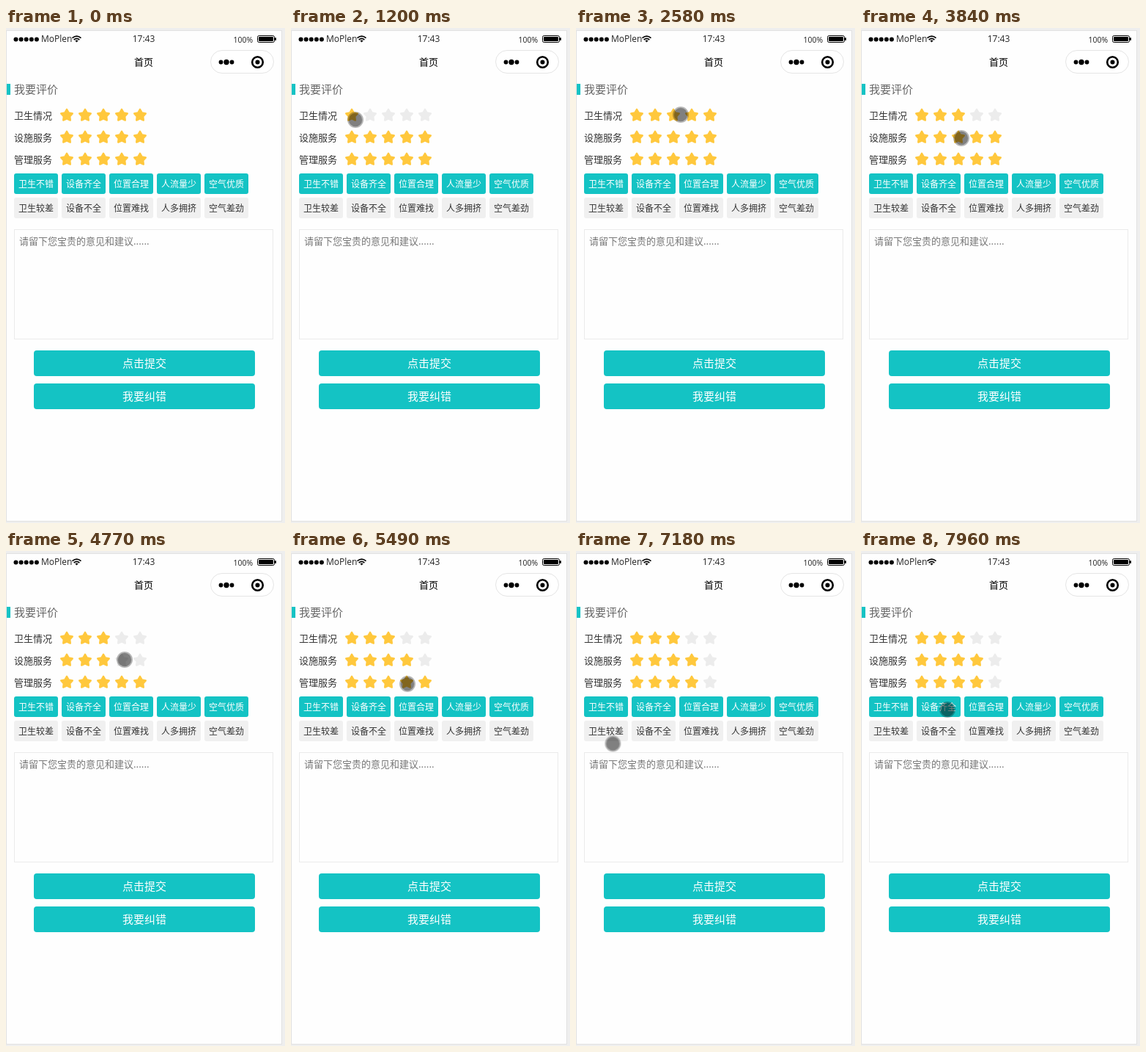
Write an HTML page that moves like this. It is 381 by 674 pixels and loops after 8 s.

```html
<!DOCTYPE html>
<html lang="zh-CN">
<head>
<meta charset="utf-8">
<title>首页</title>
<style>
html, body { margin: 0; width: 100%; height: 100%; overflow: hidden; background: #eee; }
svg { display: block; width: 381px; height: 674px; }
text { font-family: "Noto Sans CJK SC", "Noto Sans CJK", "Noto Sans", sans-serif; fill: #333; }
.latin { font-family: "Open Sans", "Noto Sans", sans-serif; fill: #222; }
.mid { text-anchor: middle; }
.white { fill: #fff; }
.teal { fill: #14c3c4; }
.star { fill: #ffc83d; stroke: #ffc83d; stroke-width: 2.4; stroke-linejoin: round; }

/* 1% = 80 ms */
.r0s1, .r0s2 { animation: rate-a 8s step-end infinite; }
.r0s3, .r0s4 { animation: rate-b 8s step-end infinite; }
.r1s3 { animation: rate-c 8s step-end infinite; }
.r1s4 { animation: rate-d 8s step-end infinite; }
.r2s4 { animation: rate-e 8s step-end infinite; }
@keyframes rate-a {
  15% { fill: #ececec; stroke: #ececec; }
  0%, 27.5%, 100% { fill: #ffc83d; stroke: #ffc83d; }
}
@keyframes rate-b {
  0%, 27.5% { fill: #ffc83d; stroke: #ffc83d; }
  15%, 37.375%, 100% { fill: #ececec; stroke: #ececec; }
}
@keyframes rate-c {
  50.125% { fill: #ececec; stroke: #ececec; }
  0%, 61.75%, 100% { fill: #ffc83d; stroke: #ffc83d; }
}
@keyframes rate-d {
  0% { fill: #ffc83d; stroke: #ffc83d; }
  50.125%, 100% { fill: #ececec; stroke: #ececec; }
}
@keyframes rate-e {
  0% { fill: #ffc83d; stroke: #ffc83d; }
  77.375%, 100% { fill: #ececec; stroke: #ececec; }
}

#touch { animation: move 8s linear infinite, show 8s step-end infinite; }
@keyframes show {
  0% { opacity: 0; }
  2.5%, 100% { opacity: 1; }
}
@keyframes move {
  0%, 2.5% { transform: translate(153px, 605px); }
  3.4% { transform: translate(138px, 515px); }
  4.3% { transform: translate(104px, 412px); }
  5.2% { transform: translate(60px, 300px); }
  6.1% { transform: translate(28px, 205px); }
  7% { transform: translate(34px, 150px); }
  8.1% { transform: translate(68px, 122px); }
  9.125%, 14.9% { transform: translate(82px, 128px); }
  15%, 15.8% { transform: translate(88px, 125px); }
  19% { transform: translate(100px, 119px); }
  22.75%, 27.4% { transform: translate(111px, 120px); }
  30% { transform: translate(129px, 119px); }
  32.25%, 33.3% { transform: translate(143px, 118px); }
  34.5%, 36.9% { transform: translate(142px, 118px); }
  39% { transform: translate(140px, 137px); }
  41.375%, 44.5% { transform: translate(138px, 157px); }
  46.5% { transform: translate(139px, 153px); }
  48%, 51.4% { transform: translate(137px, 150px); }
  54% { transform: translate(144px, 154px); }
  57.5% { transform: translate(165px, 151px); }
  59.625%, 61.4% { transform: translate(162px, 148px); }
  63.625%, 67% { transform: translate(160px, 180px); }
  68.625%, 71.8% { transform: translate(159px, 181px); }
  72.375%, 77.1% { transform: translate(160px, 181px); }
  80.375% { transform: translate(158px, 208px); }
  82.5% { transform: translate(132px, 235px); }
  85% { transform: translate(92px, 262px); }
  86.875%, 87.3% { transform: translate(73px, 271px); }
  91% { transform: translate(39px, 258px); }
  93.5% { transform: translate(44px, 243px); }
  97.625%, 98% { transform: translate(113px, 221px); }
  99.5%, 100% { transform: translate(118px, 216px); }
}
</style>
</head>
<body>
<svg viewBox="0 0 381 674">
  <defs>
    <path id="star" d="M0-8.2 2.6-3.6 7.8-2.5 4.2 1.4 4.8 6.6 0 4.4-4.8 6.6-4.2 1.4-7.8-2.5-2.6-3.6Z"/>
  </defs>
  <rect width="381" height="674" fill="#eee"/>
  <rect x=".5" y="3.5" width="376" height="668" fill="#fefefe" stroke="#e2e2e2"/>

  <g id="signal"></g>
  <text class="latin" x="48" y="19" font-size="12">MoPlen</text>
  <g fill="none" stroke="#000" stroke-width="1.7">
    <path d="M90.5 13.6Q96.5 8.6 102.500 13.6M92.700 16Q96.500 12.800 100.300 16"/>
    <path d="M94.400 17.300Q96.500 15.600 98.600 17.300L96.500 19.400Z" fill="#000" stroke="none"/>
  </g>
  <text class="latin mid" x="188" y="19" font-size="12">17:43</text>
  <text class="latin" x="310.500" y="20" font-size="10.500">100%</text>
  <rect x="343.500" y="10.500" width="23" height="9" rx="2" fill="none" stroke="#000"/>
  <rect x="345" y="12" width="20" height="6" rx="1"/>
  <rect x="367" y="13" width="2" height="4" rx="1"/>

  <text class="mid" x="188" y="51" font-size="13" style="fill:#000">首页</text>
  <rect x="279.500" y="30.500" width="86" height="31" rx="15.500" fill="#fff" stroke="#e5e5e5"/>
  <circle cx="293.500" cy="46.500" r="2.900"/>
  <circle cx="301" cy="46.500" r="3.700"/>
  <circle cx="308.500" cy="46.500" r="2.900"/>
  <circle cx="343.500" cy="46.500" r="7.300" fill="none" stroke="#000" stroke-width="2.600"/>
  <circle cx="343.500" cy="46.500" r="3"/>

  <rect class="teal" x="1" y="76" width="5" height="15"/>
  <text x="11" y="89" font-size="15" style="fill:#666">我要评价</text>
  <g id="ratings"></g>
  <g id="tags"></g>

  <rect x="11.500" y="274.500" width="353" height="149" fill="none" stroke="#ebebeb"/>
  <text x="18" y="295" font-size="13" style="fill:#777">请留下您宝贵的意见和建议......</text>
  <g id="buttons"></g>

  <g id="touch">
    <circle r="11" fill="#000" fill-opacity=".28"/>
    <circle r="9.200" fill="#000" fill-opacity=".3"/>
  </g>
</svg>
<script>
const fill = (id, items, draw) => {
  document.getElementById(id).innerHTML = items.map(draw).join('');
};
const range = n => [...Array(n).keys()];

fill('signal', range(5), i => `<circle cx="${13.5 + i * 7.1}" cy="15.5" r="3"/>`);

fill('ratings', ['卫生情况', '设施服务', '管理服务'], (label, r) => {
  const y = 119 + r * 30;
  const stars = range(5).map(s =>
    `<use href="#star" class="star r${r}s${s}" x="${83 + s * 25}" y="${y}"/>`);
  return `<text x="11" y="${y + 5}" font-size="13">${label}</text>${stars.join('')}`;
});

const tags = ['卫生不错', '设备齐全', '位置合理', '人流量少', '空气优质',
  '卫生较差', '设备不全', '位置难找', '人多拥挤', '空气差劲'];
fill('tags', tags, (label, i) => {
  const x = 11 + i % 5 * 65, good = i < 5, y = good ? 198 : 231;
  return `<rect x="${x}" y="${y}" width="60" height="28" rx="3" fill="#f0f0f0" class="${good ? 'teal' : ''}"/>
    <text class="mid ${good ? 'white' : ''}" x="${x + 30}" y="${y + 19}" font-size="12">${label}</text>`;
});

fill('buttons', ['点击提交', '我要纠错'], (label, i) => {
  const y = 439 + i * 45;
  return `<rect class="teal" x="38" y="${y}" width="302" height="35" rx="4"/>
    <text class="mid white" x="189" y="${y + 23}" font-size="15">${label}</text>`;
});
</script>
</body>
</html>
```
